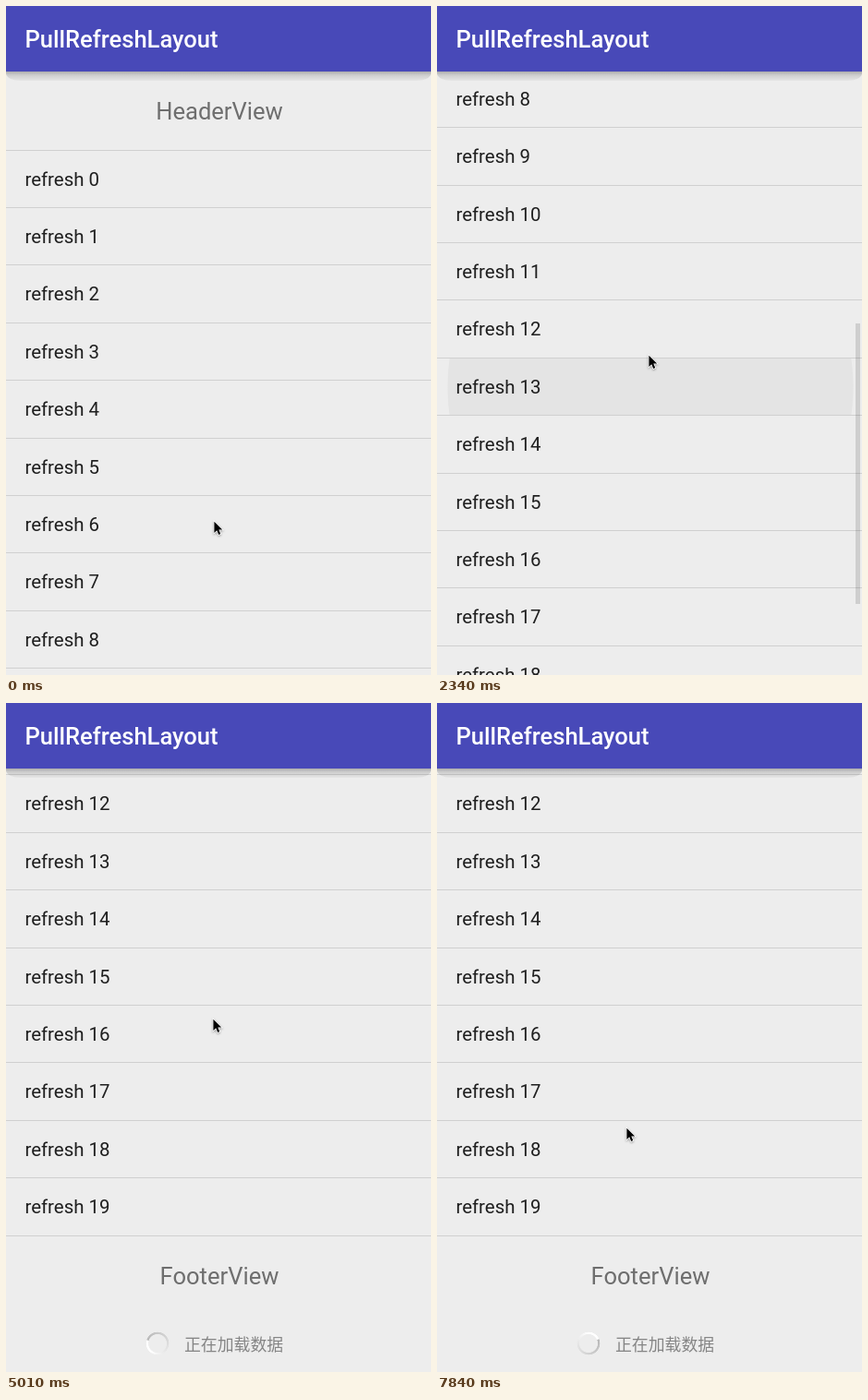
Recreate the animation shown at these times as an HTML page. Size 460 px wide and 725 px high, loop 7.99 s.

```html
<!DOCTYPE html>
<html lang="en">
<head>
<meta charset="utf-8">
<title>PullRefreshLayout</title>
<style>
  html, body { margin: 0; width: 100%; height: 100%; overflow: hidden; background: #ededed; }
  #stage {
    --dp: calc(460px / 360);
    position: relative; width: 460px; height: 725px; overflow: hidden;
    background: #ededed; font-family: Roboto, sans-serif;
  }
  #stage > *, #list > * { position: absolute; left: 0; top: 0; box-sizing: border-box; }
  #list { width: 460px; height: 725px; overflow: hidden; }
  .row {
    width: 460px; height: 63px; padding-left: calc(16 * var(--dp)); border-top: 1px solid #d0d0d0;
    font-size: calc(16 * var(--dp)); line-height: 63px; color: #1f1f1f; white-space: pre;
  }
  .caption {
    width: 462px; height: 85px; font-size: calc(20 * var(--dp)); line-height: 87px;
    text-align: center; color: #6e6e6e;
  }
  .loader { width: 460px; height: 63px; }
  .loader span {
    position: absolute; left: 193px; top: 0; white-space: nowrap; line-height: 64px;
    font-family: "Noto Sans CJK SC", "Noto Sans CJK", sans-serif;
    font-size: calc(14 * var(--dp)); color: #858585;
  }
  #spinner {
    position: absolute; left: 151px; top: 19px; width: 26px; height: 26px; border-radius: 50%;
    background: conic-gradient(#b8b8b8, #e6e6e6 200deg, #fff 290deg, #fff 355deg, #b8b8b8);
    -webkit-mask: radial-gradient(circle, transparent 9.7px, #000 10.3px, #000 12px, transparent 12.6px);
    mask: radial-gradient(circle, transparent 9.7px, #000 10.3px, #000 12px, transparent 12.6px);
  }
  #bar { left: 453px !important; width: 5px; height: 304px; background: rgba(0, 0, 0, .13); }
  #shade {
    top: 71px !important; width: 460px; height: 10px; border-radius: 0 0 16px 16px / 0 0 8px 8px;
    background: linear-gradient(rgba(0, 0, 0, .27), rgba(0, 0, 0, .13) 40%, rgba(0, 0, 0, .03));
  }
  #toolbar {
    width: 460px; height: 71px; padding-left: calc(16 * var(--dp)); background: #4849b8; color: #fff;
    font-size: calc(20 * var(--dp)); font-weight: 500; line-height: 72px;
  }
  #cursor { overflow: visible; filter: drop-shadow(0 1px 1px rgba(0, 0, 0, .35)); }
</style>
</head>
<body>
<div id="stage">
  <div id="list"></div>
  <div id="bar"></div>
  <div id="shade"></div>
  <div id="toolbar">PullRefreshLayout</div>
  <svg id="cursor" width="11" height="17">
    <path d="M1.4 1.8V14L4.2 11.3 6.2 15.9 8.2 15 6.3 10.6H10.2Z" fill="#000" stroke="#fff" stroke-width="1.5" paint-order="stroke"/>
  </svg>
</div>
<script>
const LOOP = 7990, TICK = 148.6, LEAD = 45, LAST = 53;
const TOP = 71, HEADER = 85, PITCH = 62.4, COUNT = 20, PRESSED = 13;
const LIST_END = TOP + HEADER + PITCH * COUNT;

const byId = id => document.getElementById(id);
const list = byId('list'), bar = byId('bar'), cursor = byId('cursor');
const items = [];

function addItem(className, y, html) {
  const el = document.createElement('div');
  el.className = className;
  el.innerHTML = html;
  list.append(el);
  items.push({ el, y });
  return el;
}

addItem('caption', TOP, 'HeaderView');
const rows = Array.from({ length: COUNT + 1 }, (_, i) =>
  addItem('row', TOP + HEADER + PITCH * i, i < COUNT ? 'refresh ' + i : ''));
addItem('caption', LIST_END + 1, 'FooterView');
addItem('loader', LIST_END + HEADER, '<i id="spinner"></i><span lang="zh-CN">正在加载数据</span>');
const spinner = byId('spinner');

// The bar counts list items, so the taller header weighs as much as one row.
function barTop(scroll) {
  const passed = scroll < HEADER ? scroll / HEADER : 1 + (scroll - HEADER) / PITCH;
  return Math.min(420, TOP + 5 + passed / (COUNT + 2) * 654);
}

function draw(now) {
  const tick = Math.min(LAST, Math.floor((now % LOOP + LEAD) / TICK));
  const span = (from, to) => Math.min(1, Math.max(0, (tick - from) / (to - from)));
  const ease = (from, to) => (1 - Math.cos(Math.PI * span(from, to))) / 2;

  // The list is flung, settles, is pulled to the loader, dragged back and pulled again.
  const scroll = 586 * ease(5.74, 15) + 57.5 * ease(16, 20)
    + 183.5 * (ease(22, 27) - ease(36, 41) + ease(42, 47));

  const swipe = ease(6, 10.4), lower = ease(16, 21), pull = ease(22, 26);
  const drag = ease(36, 41), repull = ease(42, 46);
  const x = 224 + 4 * swipe - 8 * lower + 3 * pull - 12 * drag - 7 * repull
    + 105 * Math.sin(Math.PI * span(46, LAST));
  const y = 557 - 180 * swipe + 130 * lower - 166 * pull + 208 * drag - 90 * repull;

  for (const { el, y: top } of items)
    el.style.transform = `translateY(${Math.floor(top - scroll)}px)`;

  const radius = 73 * (tick - 13);
  const tint = radius > 0 ? .04 * (1 - span(16, 18)) : 0;
  rows[PRESSED].style.background =
    `radial-gradient(circle at 231px 31px, rgba(0,0,0,${tint}) ${radius}px, transparent ${radius + 1}px)`;

  bar.style.transform = `translateY(${Math.round(barTop(scroll))}px)`;
  bar.style.opacity = span(6, 7) - span(25, 27) + span(37, 38) - span(45, 47);
  cursor.style.transform = `translate(${Math.round(x)}px, ${Math.round(y)}px)`;
  spinner.style.transform = `rotate(${290 + (tick - 34) * 64.2}deg)`;
}

const start = performance.now();
function loop() {
  draw(performance.now() - start);
  requestAnimationFrame(loop);
}
loop();
</script>
</body>
</html>
```
